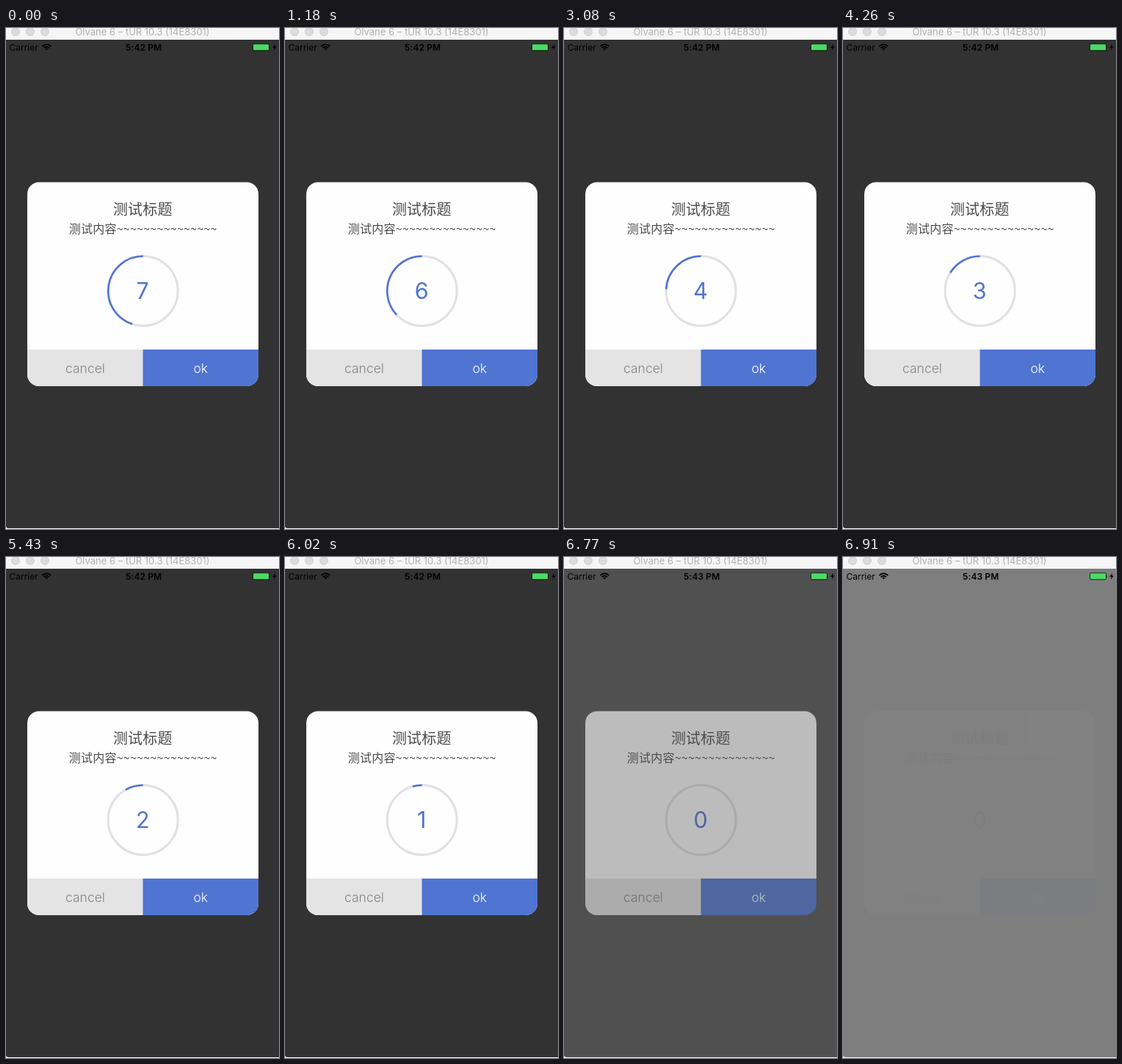
An HTML page that plays this animation: 372 px wide and 684 px high, repeating every 7.16 s.

```html
<!DOCTYPE html>
<html lang="zh">
<head>
<meta charset="utf-8">
<style>
  html, body { margin: 0; width: 100%; height: 100%; overflow: hidden; background: #fff; }
  svg { display: block; width: 372px; height: 684px; font-family: Inter, Roboto, sans-serif; }
  .cjk { font-family: "Noto Sans CJK SC", "Noto Sans CJK", "Noto Sans CJK JP", sans-serif; fill: #4a4a4a; }
  .mid { text-anchor: middle; }
  .btn { font-size: 17.5px; font-weight: 300; }
</style>
</head>
<body>
<svg viewBox="0 0 372 684">
  <defs>
    <clipPath id="cardClip"><rect x="29" y="210.5" width="315" height="278.5" rx="16"/></clipPath>
    <path id="screen" d="M0 16H372V683H4Q0 683 0 680Z"/>
  </defs>

  <rect width="372" height="16" fill="#f6f6f6"/>
  <g fill="#dcdcdc" stroke="#d0d0d0">
    <circle cx="13" cy="5" r="5.5"/><circle cx="33" cy="5" r="5.5"/><circle cx="53" cy="5" r="5.5"/>
  </g>
  <text class="mid" x="186" y="10" font-size="13" fill="#b0b0b0">Olvane 6 – tUR 10.3 (14E8301)</text>

  <use href="#screen" fill="#808080"/>
  <use href="#screen" id="shade" fill="#000"/>

  <g id="card" clip-path="url(#cardClip)">
    <rect x="29" y="210" width="315" height="279" fill="#fefefe"/>
    <rect x="29" y="439" width="157.5" height="50" fill="#e4e4e4"/>
    <rect x="186.5" y="439" width="157.5" height="50" fill="#4f74d2"/>
    <text class="cjk mid" x="186.3" y="254.5" font-size="20" font-weight="500" letter-spacing=".2">测试标题</text>
    <text class="cjk mid" x="186.7" y="279.5" font-size="16" font-weight="350" letter-spacing=".25">测试内容~~~~~~~~~~~~~~~</text>
    <circle cx="186.7" cy="359" r="47.5" fill="none" stroke="#e0e0e5" stroke-width="3"/>
    <path id="arc" fill="none" stroke="#4f74d2" stroke-width="2.6"/>
    <text id="count" class="mid" x="186.2" y="370" font-size="30.5" fill="#4f74d2"></text>
    <text class="mid btn" x="108" y="470.5" fill="#848484">cancel</text>
    <text class="mid btn" x="265.3" y="470.5" fill="#fff">ok</text>
  </g>

  <text x="4.5" y="31" font-size="12">Carrier</text>
  <g fill="none" stroke="#000" stroke-width="1.7">
    <path d="M49.3 25.2Q55.3 19.4 61.3 25.2M51.5 27.4Q55.3 23.8 59.1 27.4"/>
    <path d="M53.3 28.4Q55.3 26.8 57.3 28.4L55.3 30.6Z" fill="#000" stroke="none"/>
  </g>
  <text id="clock" class="mid" x="187.7" y="31" font-size="12" font-weight="600" letter-spacing=".1"></text>
  <rect x="336.5" y="21.8" width="22" height="9" rx="1.5" fill="#4cd964" stroke="#000" stroke-width=".8"/>
  <path d="M359.6 24.6Q361.2 26.3 359.6 28Z"/>
  <path d="M367.2 21.8L363.2 27H365.7L364.8 30.8L368.8 25.5H366.3Z"/>
</svg>
<script>
  const LOOP = 7160, STEP = 146.7, LAST = 47;
  const START = 162.1, SPEED = 24.3;   // degrees, degrees per second
  const CX = 186.7, CY = 359, R = 47.5;
  const el = id => document.getElementById(id);
  const shade = el('shade'), card = el('card'), arc = el('arc'), count = el('count'), clock = el('clock');

  function arcPath(deg) {
    if (deg <= 0) return '';
    const a = deg * Math.PI / 180;
    return `M${CX} ${CY - R}A${R} ${R} 0 0 0 ${CX - R * Math.sin(a)} ${CY - R * Math.cos(a)}`;
  }

  function alphaAt(step) {
    if (step < LAST - 1) return 1;
    return step < LAST ? 0.625 : 0.028;
  }

  function draw(ms) {
    const step = Math.min(LAST, Math.floor(ms / STEP));
    const sec = step * 0.147;
    const deg = Math.max(0, START - SPEED * sec);
    const alpha = alphaAt(step);
    arc.setAttribute('d', arcPath(deg));
    count.textContent = Math.ceil(deg / SPEED);
    clock.textContent = sec < 6.3 ? '5:42 PM' : '5:43 PM';
    shade.setAttribute('opacity', 0.61 * alpha);
    card.setAttribute('opacity', alpha);
  }

  const t0 = performance.now();
  function tick() {
    draw((performance.now() - t0) % LOOP);
    requestAnimationFrame(tick);
  }
  draw(0);
  requestAnimationFrame(tick);
</script>
</body>
</html>
```
